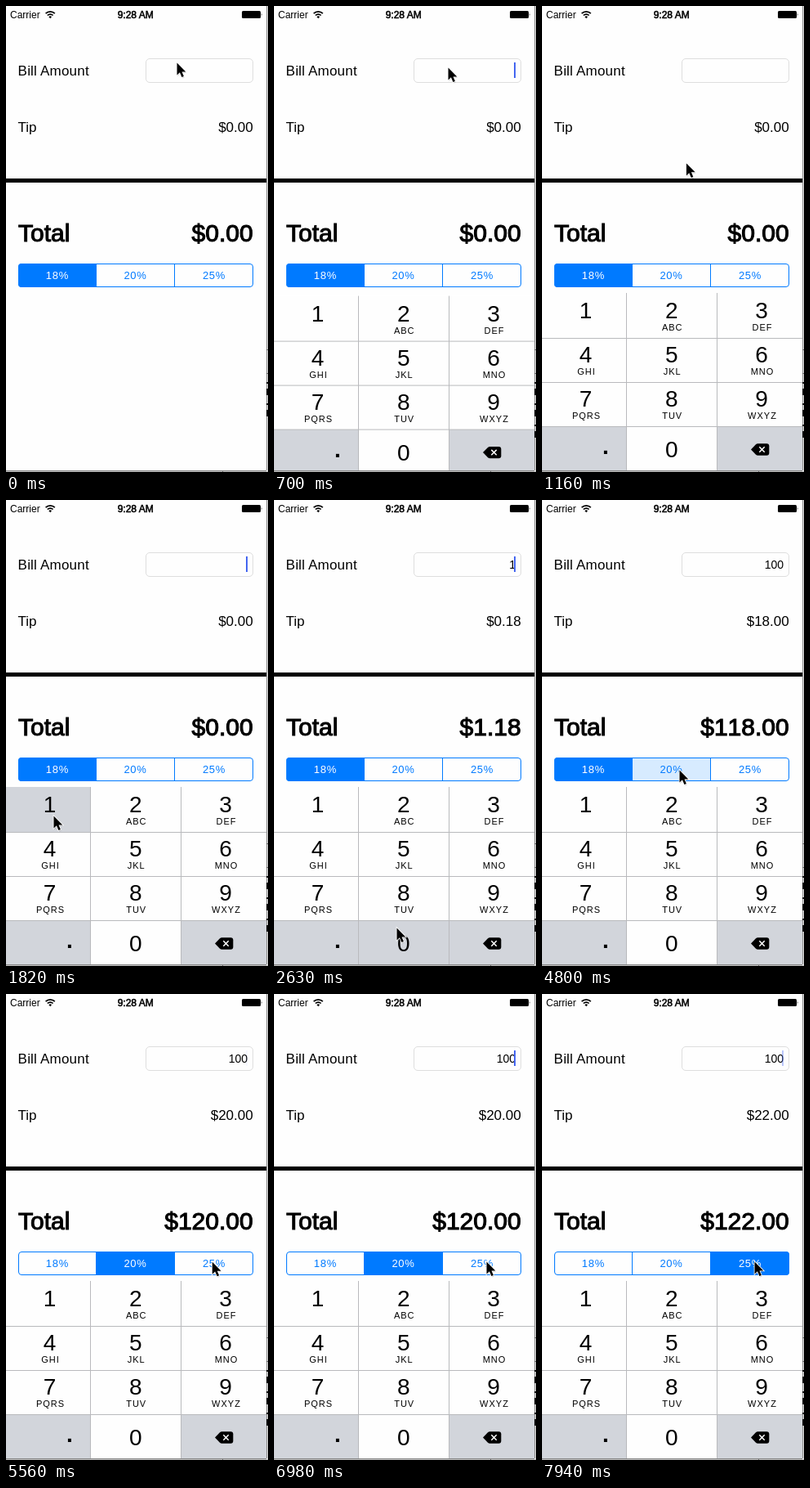
An HTML page that plays this animation: 321x570 px, repeating every 8 s.

```html
<!DOCTYPE html>
<html lang="en">
<head>
<meta charset="utf-8">
<title>Tip calculator</title>
<style>
  html, body { margin: 0; width: 100%; height: 100%; overflow: hidden; background: #fefefe; }
  svg { display: block; font-family: "Liberation Sans", Arial, sans-serif; }
  .num { font-kerning: none; text-anchor: end; }
  .big { font-size: 30px; stroke: #000; stroke-width: 1.1; }
  .row { font-size: 17px; }
  .mid { text-anchor: middle; }
  .seg { font-size: 13px; letter-spacing: .7px; }
  .digit { font-size: 28px; }
  .abc { font-size: 11px; letter-spacing: 1px; }
</style>
</head>
<body>
<svg id="stage" width="321" height="570" viewBox="0 0 321 570">
  <defs>
    <clipPath id="screen"><rect width="319" height="568"/></clipPath>
    <clipPath id="pill"><rect x="15" y="315" width="288" height="29" rx="4"/></clipPath>
  </defs>
  <rect width="321" height="570" fill="#fefefe"/>

  <!-- window edge -->
  <path d="M319.5 0V568" stroke="#8f8f8f"/>
  <path d="M320.5 0V570" stroke="#dcdcdc"/>
  <path d="M0 568.5H319" stroke="#858585"/>
  <path d="M0 569.5H321" stroke="#bdbdbd"/>
  <path d="M265.5 569V570M319 420.5H321M319 449.5H321" stroke="#666"/>
  <path d="M320 460v2M320 468v8M320 486v2M320 494v8" stroke="#111" stroke-width="2"/>
  <path id="edge" d="M320 512v2M320 520v8" stroke="#111" stroke-width="2"/>

  <!-- status bar -->
  <text x="5" y="15" font-size="12">Carrier</text>
  <g fill="none" stroke="#000" stroke-width="1.7">
    <path d="M48.6 9.2a7.8 7.8 0 0 1 11.2 0M50.8 11.5a4.8 4.8 0 0 1 6.8 0"/>
  </g>
  <path d="M54.2 15.2l-1.8-2a2.6 2.6 0 0 1 3.6 0z"/>
  <text class="mid" x="158.7" y="15" font-size="12" stroke="#000" stroke-width=".55">9:28 AM</text>
  <rect x="289" y="6" width="23" height="9" rx="1.5"/>
  <path d="M312.8 8.7q1.4 1.8 0 3.6z"/>

  <!-- bill -->
  <text class="row" x="14.6" y="85" letter-spacing=".2">Bill Amount</text>
  <rect x="171.5" y="64.5" width="131" height="29" rx="4.5" fill="#fefefe" stroke="#dedede"/>
  <text id="bill" class="num" x="296" y="84" font-size="14"></text>
  <rect id="caret" x="294" y="69" width="2" height="19" fill="#4466f0"/>
  <text class="row" x="14.6" y="154">Tip</text>
  <text id="tip" class="num row" x="302.7" y="154"></text>
  <rect y="211" width="319" height="5"/>
  <text class="big" x="15" y="288">Total</text>
  <text id="total" class="num big" x="302.7" y="288"></text>

  <g id="segments"></g>
  <g clip-path="url(#screen)"><g id="keys"></g></g>

  <g id="cursor">
    <path d="M0 0V15L3.4 11.8L5.9 17.6L8.4 16.5L6 10.9H10.8Z" transform="translate(.8 1.4)" fill="#000" opacity=".18"/>
    <path d="M0 0V15L3.4 11.8L5.9 17.6L8.4 16.5L6 10.9H10.8Z" stroke="#fff" stroke-width="1.6" paint-order="stroke"/>
  </g>
</svg>
<script>
const LOOP = 8000, BLUE = '#007aff', PAPER = '#fefefe', GREY = '#d2d5db';
const $ = id => document.getElementById(id);

function add(parent, tag, attrs, text) {
  const el = document.createElementNS('http://www.w3.org/2000/svg', tag);
  for (const k in attrs) el.setAttribute(k, attrs[k]);
  if (text) el.textContent = text;
  return parent.appendChild(el);
}

// Segmented control
const segBox = $('segments');
const segFill = add(segBox, 'g', { 'clip-path': 'url(#pill)' });
const edges = [15, 110.5, 206.5, 303];
const segs = ['18%', '20%', '25%'].map((label, i) => ({
  rect: add(segFill, 'rect', { x: edges[i], y: 315, width: edges[i + 1] - edges[i], height: 29 }),
  text: add(segBox, 'text', { class: 'seg mid', x: [62.9, 158.5, 255][i], y: 334 }, label)
}));
add(segBox, 'path', { d: 'M110.5 316V343M206.5 316V343', stroke: BLUE });
add(segBox, 'rect', { x: 15.5, y: 315.5, width: 287, height: 28, rx: 3.5, fill: 'none', stroke: BLUE });

// Number pad
const pad = $('keys'), keyRect = {};
const colX = [0, 103.5, 214.5, 319], colMid = [53.5, 158.7, 269], rowY = [351, 406.5, 460.5, 514.5, 568];
['1', '2 ABC', '3 DEF', '4 GHI', '5 JKL', '6 MNO', '7 PQRS', '8 TUV', '9 WXYZ', '.', '0', 'del'].forEach((key, i) => {
  const c = i % 3, r = Math.floor(i / 3), [name, abc] = key.split(' ');
  keyRect[name] = add(pad, 'rect', {
    x: colX[c], y: rowY[r], width: colX[c + 1] - colX[c], height: rowY[r + 1] - rowY[r],
    fill: r === 3 && c !== 1 ? GREY : PAPER
  });
  if (name === '.') add(pad, 'text', { class: 'digit mid', x: 78, y: 548, 'font-weight': 'bold' }, '.');
  else if (name !== 'del')
    add(pad, 'text', { class: 'digit mid', x: colMid[c], y: r === 3 ? 552 : 382 + 54 * r }, name);
  if (abc) add(pad, 'text', { class: 'abc mid', x: colMid[c] + 1, y: 397 + 54 * r }, abc);
});
add(pad, 'path', { d: 'M0 406.5H319M0 460.5H319M0 514.5H319M103.5 351V568M214.5 351V568', stroke: '#b9babd' });
add(pad, 'path', { d: 'M256 542.5L262 536.3Q263 535.3 264.5 535.3H275.3Q278.3 535.3 278.3 538.3V546.7Q278.3 549.7 275.3 549.7H264.5Q263 549.7 262 548.7Z' });
add(pad, 'path', { d: 'M266.3 539.3l6.4 6.4M272.7 539.3l-6.4 6.4', stroke: '#fff', 'stroke-width': 1.5 });

// Timeline tables
const path = [
  [0, 209, 69], [58, 209, 69], [60, 213, 75], [1000, 213, 75],
  [1180, 170, 210], [1400, 80, 440], [1480, 66, 453], [1720, 58, 386], [1960, 58, 386],
  [2200, 100, 450], [2520, 150, 523], [3345, 150, 523],
  [3480, 125, 540], [3640, 102, 500], [3880, 140, 380], [4110, 175, 336],
  [4300, 174, 335], [4600, 168, 330], [5290, 168, 330],
  [5620, 260, 327], [LOOP, 260, 327]
];
const typed = [[0, ''], [1925, '1'], [2680, '10'], [2915, '100']];
const chosen = [[0, 0], [4910, 1], [7455, 2]];
const rates = [.18, .2, .22];
const keyTaps = [['1', 1790, 1925], ['0', 2600, 2690], ['0', 2800, 2930]];
const segTaps = [[1, 4790, 4910], [2, 7335, 7455]];

const at = (steps, t) => steps.filter(s => s[0] <= t).pop()[1];
const within = (t, from, to) => t >= from && t < to;
const clamp = v => Math.max(0, Math.min(1, v));
const money = v => '$' + v.toFixed(2);

// Hermite curve through the path, at rest where a point repeats
function slope(i, k) {
  const a = path[i - 1], b = path[i], c = path[i + 1];
  const same = (p, q) => p[1] === q[1] && p[2] === q[2];
  if (!a || !c || same(a, b) || same(b, c)) return 0;
  return (c[k] - a[k]) / (c[0] - a[0]);
}
function cursorAt(t) {
  let i = 0;
  while (i < path.length - 2 && path[i + 1][0] <= t) i++;
  const a = path[i], b = path[i + 1], d = b[0] - a[0], u = (t - a[0]) / d;
  return [1, 2].map(k => {
    const v = 1 - u;
    return a[k] * (1 + 2 * u) * v * v + b[k] * u * u * (3 - 2 * u)
      + d * u * v * (slope(i, k) * v - slope(i + 1, k) * u);
  });
}

function caretAt(t) {
  if (t < 290) return 0;
  if (within(t, 1925, 2915)) return 1;
  const p = (t - (t < 1925 ? 290 : 2825)) % 1017;
  return p < 535 ? clamp(p / 85) : 1 - clamp((p - 535) / 175);
}

function padOffset(t) {
  const x = .0144 * Math.max(0, t - 280), y = 219 * (1 + x) * Math.exp(-x);
  return y < .3 ? 0 : y;
}

function draw(t) {
  const bill = at(typed, t), pick = at(chosen, t);
  const tip = Number(bill) * rates[pick];
  $('bill').textContent = bill;
  $('tip').textContent = money(tip);
  $('total').textContent = money(Number(bill) + tip);
  $('caret').setAttribute('opacity', caretAt(t));
  $('edge').setAttribute('opacity', t < 240 ? 0 : 1);

  segs.forEach((s, i) => {
    const down = segTaps.some(([n, a, b]) => n === i && within(t, a, b));
    s.rect.setAttribute('fill', i === pick ? BLUE : down ? '#d7ebff' : PAPER);
    s.text.setAttribute('fill', i === pick ? '#fff' : BLUE);
  });

  for (const name of ['1', '0']) {
    const down = keyTaps.some(([n, a, b]) => n === name && within(t, a, b));
    keyRect[name].setAttribute('fill', down ? GREY : PAPER);
  }
  pad.setAttribute('transform', `translate(0 ${padOffset(t)})`);
  $('cursor').setAttribute('transform', `translate(${cursorAt(t).map(v => v + .5)})`);
}

const start = performance.now();
function tick() {
  draw((performance.now() - start) % LOOP);
  requestAnimationFrame(tick);
}
tick();
</script>
</body>
</html>
```
